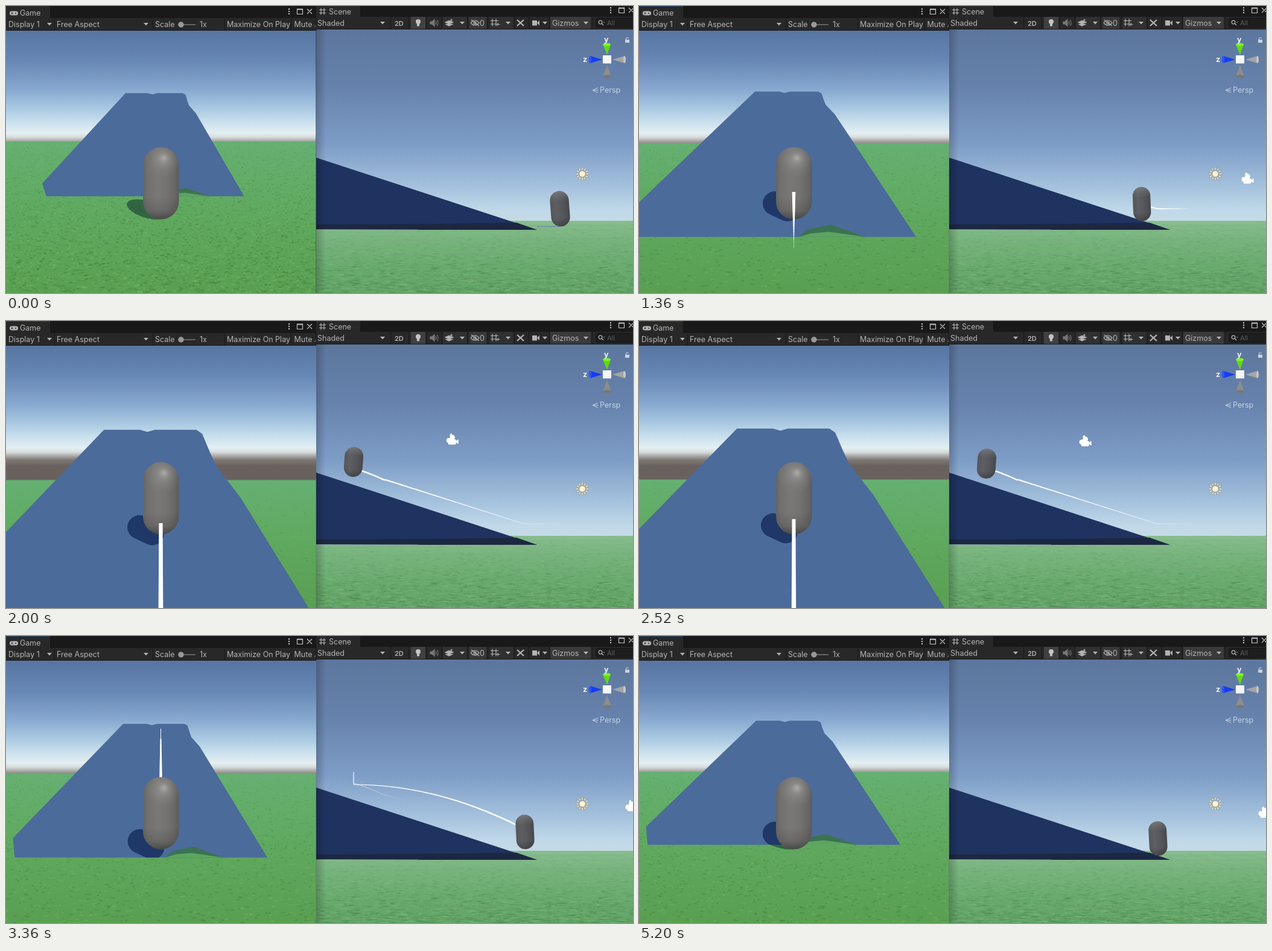
Animation, 1039 px wide and 477 px high, one loop 5.28 s. Source, as an HTML page with a canvas:

```html
<!DOCTYPE html>
<html lang="en">
<head>
<meta charset="utf-8">
<title>Ramp jump</title>
<style>
html, body { margin: 0; width: 100%; height: 100%; overflow: hidden; background: #191919; }
canvas, svg { position: absolute; left: 0; top: 0; display: block; }
text { font: 12.5px Inter, "Liberation Sans", sans-serif; fill: #b4b4b4; }
</style>
</head>
<body>
<canvas id="view" width="1039" height="477"></canvas>
<svg id="ui" width="1039" height="477" viewBox="0 0 1039 477">
  <g id="bars">
    <rect width="514" height="41" fill="#191919"/>
    <rect width="73" height="21" fill="#282828"/>
    <rect y="20" width="513" height="20" fill="#282828"/>
    <rect x="514" width="525" height="39" fill="#191919"/>
    <rect x="514" width="73" height="19" fill="#282828"/>
    <rect x="514" y="18" width="525" height="20" fill="#282828"/>
    <rect x="671" y="18" width="24" height="20" fill="#404040"/>
    <rect x="724" y="18" width="40" height="20" fill="#303030"/>
    <rect x="768" y="18" width="28" height="20" fill="#383838"/>
    <rect x="802" y="18" width="38" height="20" fill="#303030"/>
    <rect x="902" y="18" width="67" height="20" fill="#3a3a3a"/>
    <rect x="977.5" y="20.5" width="70" height="15" rx="3" fill="#1e1e1e" stroke="#141414"/>
  </g>
  <rect id="focus" width="73" height="1" fill="#24486b"/>
  <g id="icons" fill="none" stroke="#b4b4b4" stroke-width="1.2">
    <rect x="6.5" y="9" width="13" height="6" rx="3" fill="#b4b4b4"/>
    <path d="M8.5 12h3M10 10.5v3" stroke="#282828"/><circle cx="16" cy="12" r="1" fill="#282828" stroke="none"/>
    <path d="M519 6.500h11M519 11.500h11M522 3.500v11M527 3.500v11"/>
    <path d="M285 31h29" stroke="#636363" stroke-width="2"/><circle cx="290" cy="31" r="4.700" fill="#999" stroke="none"/>
    <g fill="#c4c4c4" stroke="none"><circle cx="683" cy="26" r="4"/><rect x="681" y="29" width="4" height="4.500"/></g>
    <g stroke="#777"><path d="M703 26h3l4-3.500v11l-4-3.500h-3z" fill="#777"/><path d="M712 25q2 3 0 6M714.500 23q3 5 0 10"/></g>
    <path d="M728 27l6-2.500 7 2.500-7 3zM728 30l6 3 7-3M738 21.500v4M736 23.500h4" fill="#b4b4b4"/>
    <path d="M770 28q7-8 14 0q-7 8-14 0M771 23l13 10"/><circle cx="777" cy="28" r="2"/>
    <path d="M803 24.500h13M803 30h9M806 21.500v12M812 21.500v12M815 28v5M812.500 30.500h6"/>
    <path d="M847 23l11 10M858 23l-11 10" stroke-width="2.300"/>
    <g fill="#b4b4b4" stroke="none"><rect x="872" y="24" width="8" height="8.500"/><path d="M880 28l4-4v8.500z"/></g>
    <circle cx="985" cy="27" r="2.800"/><path d="M987 29l3 3M990 27l2 0"/>
    <g stroke="none"><rect x="1026" y="56" width="7" height="5" fill="#ccd3dc"/></g>
    <path d="M1027.500 56v-2q2-3 4 0" stroke="#ccd3dc"/>
  </g>
  <g id="labels">
    <text x="23" y="16">Game</text><text x="4" y="35">Display 1</text><text x="84" y="35">Free Aspect</text>
    <text x="247" y="35">Scale</text><text x="321" y="35">1x</text><text x="366" y="35">Maximize On Play</text>
    <svg x="474" width="38.500" height="41"><text x="3.500" y="35">Mute Audio</text></svg>
    <text x="535" y="14">Scene</text><text x="516" y="33">Shaded</text>
    <text x="644" y="32.500" style="font-size:11px;font-weight:600">2D</text>
    <text x="785" y="33">0</text><text x="905" y="33">Gizmos</text>
    <text x="996" y="32" style="font-size:11px;fill:#5c5c5c">All</text>
  </g>
  <g id="gizmo">
    <path d="M989 64L996 81L1002 64Z" fill="#63d813"/><ellipse cx="995.500" cy="64" rx="6.500" ry="2.500" fill="#7df52b"/>
    <path d="M968 83L988 89L968 95Z" fill="#153df0"/><ellipse cx="968" cy="89" rx="2.300" ry="6" fill="#2b55ff"/>
    <path d="M1025 83L1005 89L1025 95Z" fill="#a5a5a5"/><ellipse cx="1025" cy="89" rx="2" ry="6" fill="#c6c6c6"/>
    <path d="M989 117L996 98L1003 117Z" fill="#8d8d8d"/><ellipse cx="996" cy="117" rx="7" ry="2.500" fill="#777"/>
    <rect x="989" y="82" width="14" height="13.500" fill="#f4f6f8"/>
    <text x="991" y="60" style="font-weight:700;fill:#f0f4f8">y</text>
    <text x="956" y="92.500" style="font-weight:700;fill:#f0f4f8">z</text>
    <path d="M981 136l-9 4 9 4M972 140h9" fill="none" stroke="#c3d2e6"/>
    <text x="984" y="144" style="fill:#c3d2e6">Persp</text>
  </g>
</svg>
<script>
const g = document.getElementById('view').getContext('2d');
const LOOP = 5280, STEP = 40, TRAIL = 1650, GO = 1180;
const focusLine = document.getElementById('focus');

// toolbar repeats
const extras = [];
for (const x of [80, 243, 362, 472]) extras.push(`<path d="M${x}.5 21v19" stroke="#1b1b1b"/>`);
for (const x of [637, 667, 696, 722, 764, 798, 842, 866, 900, 971]) extras.push(`<path d="M${x}.5 18v20" stroke="#1b1b1b"/>`);
for (const [x, y] of [[72, 30], [232, 30], [624, 28], [756, 28], [832, 28], [893, 28], [961, 28]])
  extras.push(`<path d="M${x - 4} ${y - 2}h8l-4 4.500z" fill="#b4b4b4" stroke="none"/>`);
for (const [x, y] of [[469, 9], [1002, 7]]) {
  for (const k of [-4, 0, 4]) extras.push(`<circle cx="${x}" cy="${y + k}" r="1.200" fill="#c4c4c4" stroke="none"/>`);
  extras.push(`<path d="M${x + 13.5} ${y - 4}h9v8.500h-9zM${x + 13.5} ${y - 3}h9M${x + 30} ${y - 4}l8 8m0-8l-8 8" stroke="#c4c4c4"/>`);
}
document.getElementById('icons').insertAdjacentHTML('beforeend', extras.join(''));

function seeded(s) {
  return () => (s = (s * 16807) % 2147483647) / 2147483647;
}

function fade(c, x0, y0, x1, y1, stops) {
  const f = c.createLinearGradient(x0, y0, x1, y1);
  stops.forEach(([p, col]) => f.addColorStop(p, col));
  return f;
}

function poly(pts, fill) {
  g.beginPath();
  pts.forEach(([x, y]) => g.lineTo(x, y));
  g.closePath();
  if (fill) { g.fillStyle = fill; g.fill(); }
}

// capsule position in the scene pane
function pos(t) {
  if (t <= GO) return [918, 337];
  if (t < 2725) {
    const x = Math.max(576, 918 - (t - GO) * 0.471);
    if (t < 1795) return [x, Math.min(337, 337 - (858 - x) * 0.319)];
    const s = t - 2275;
    const y = s < 0 ? 226 + 39 * (-s / 480) ** 2.8 : Math.min(247, 226 + 0.000183 * s * s);
    return [x, y];
  }
  const s = t - 2725;
  return [Math.min(860, 576 + s * 0.46), Math.min(336.5, 247 + 0.000195 * s * s)];
}

// trail points from newest to oldest, each with its width share
function trailAt(t) {
  const end = Math.max(GO, t - TRAIL), pts = [];
  if (t <= GO) return pts;
  let len = 0;
  for (let s = t; s >= end; s -= 8) {
    const p = pos(s), q = pts[pts.length - 1];
    if (q) len += Math.hypot(p[0] - q[0], p[1] - q[1]);
    pts.push([p[0], p[1], len]);
  }
  if (len < 0.5) return [];
  pts.forEach(p => { p[2] = 1 - p[2] / len; });
  return pts;
}

function stroke(x0, y0, x1, y1, w, col) {
  g.strokeStyle = col;
  g.lineWidth = w;
  g.beginPath(); g.moveTo(x0, y0); g.lineTo(x1, y1); g.stroke();
}

// fixed backdrop of the scene pane
const back = document.createElement('canvas');
back.width = 525; back.height = 438;
(function () {
  const c = back.getContext('2d'), rnd = seeded(41);
  c.translate(-514, -39);
  c.fillStyle = fade(c, 0, 39, 0, 357, [[0, '#5c769d'], [0.3, '#6682ac'], [0.6, '#7d9cc6'], [0.82, '#a4c1dd'], [0.95, '#c1d9e9'], [1, '#c5dae5']]);
  c.fillRect(514, 39, 525, 318);
  c.fillStyle = fade(c, 0, 357, 0, 477, [[0, '#88be8e'], [0.25, '#78b47e'], [0.6, '#6aab6f'], [1, '#60a264']]);
  c.fillRect(514, 357, 525, 120);
  for (let i = 0; i < 2400; i++) {
    const k = Math.sqrt(rnd()), y = 358 + k * 119;
    c.fillStyle = rnd() < 0.5 ? 'rgba(40,95,45,.12)' : 'rgba(160,210,155,.13)';
    c.fillRect(510 + rnd() * 530, y, 4 + k * 12 * rnd(), 0.6 + k * 1.1);
  }
  c.strokeStyle = 'rgba(130,150,135,.28)';
  c.lineWidth = 0.8;
  for (let i = -6; i < 9; i++) {
    c.beginPath(); c.moveTo(740 + i * 42, 362); c.lineTo(800 + i * 125, 477); c.stroke();
  }
  for (const y of [366, 374, 388, 412, 452]) {
    c.beginPath(); c.moveTo(514, y + 3); c.lineTo(1039, y - 2); c.stroke();
  }
})();

function drawScene(x, y, trail) {
  g.save();
  g.beginPath(); g.rect(514, 39, 525, 438); g.clip();
  g.drawImage(back, 514, 39);

  poly([[514, 252], [880, 372], [514, 372]], '#1f3360');
  poly([[514, 363], [720, 362], [846, 360], [880, 372], [683, 372], [514, 371]], '#1c2842');
  stroke(514, 371.5, 683, 372, 1, '#7f93a2');
  if (x > 885) stroke(x - 38, 366.5, x, 366.5, 1, '#6684a6');

  // sun
  g.save();
  g.translate(955, 279);
  for (let i = 0; i < 12; i++) {
    g.rotate(Math.PI / 6);
    stroke(7, 0, 11, 0, 2.6, '#8b8570');
    stroke(7, 0, 10.5, 0, 1.5, '#fdf3d4');
  }
  g.beginPath(); g.arc(0, 0, 5.3, 0, 7);
  g.fillStyle = '#fff3cd'; g.fill();
  g.strokeStyle = '#8b8570'; g.lineWidth = 0.8; g.stroke();
  g.restore();

  for (let i = 1; i < trail.length; i++) {
    const a = trail[i - 1], b = trail[i];
    stroke(a[0], a[1], b[0], b[1], 0.05 + 2.9 * b[2], '#fff');
  }

  const off = x - 739, w = 27 + Math.abs(off) * 0.024, h = 54 + off * 0.027;
  g.save();
  g.translate(x, y);
  g.rotate(-off * 0.024 * Math.PI / 180);
  g.beginPath(); g.roundRect(-w / 2, -h / 2, w, h, w / 2);
  g.fillStyle = fade(g, -w / 2, 0, w / 2, 0, [[0, '#545659'], [0.3, '#5d5f62'], [0.65, '#54565a'], [1, '#47494d']]);
  g.fill();
  g.fillStyle = fade(g, 0, -h / 2, 0, h / 2, [[0, 'rgba(135,137,138,.6)'], [0.3, 'rgba(120,122,124,0)'], [0.75, 'rgba(30,32,36,0)'], [1, 'rgba(25,28,32,.35)']]);
  g.fill();
  g.restore();

  // camera marker
  g.save();
  g.translate(x + 171 + off * 0.045, y - 40 - off * 0.02);
  g.fillStyle = '#fff';
  g.beginPath(); g.roundRect(-7, -1, 13, 9, 2); g.fill();
  g.beginPath(); g.arc(-6, 1, 4, 0, 7); g.fill();
  g.beginPath(); g.arc(0, -4, 4.3, 0, 7); g.fill();
  poly([[4, 3], [10, -1], [10, 7]], '#fff');
  poly([[-5, -7], [-2, -11], [1, -7]], '#fff');
  g.restore();

  g.fillStyle = fade(g, 514, 0, 530, 0, [[0, 'rgba(0,0,0,.2)'], [1, 'rgba(0,0,0,0)']]);
  g.fillRect(514, 39, 16, 438);
  g.restore();
}

// grass specks on the ground of the game pane
const rnd = seeded(7);
const specks = Array.from({ length: 9000 }, () => {
  const z = 1 / (0.05 + 1.15 * rnd());
  return [(rnd() - 0.5) * 600 * z, z, rnd()];
});

function drawGame(x, y, trail) {
  const MID = 256, EYE = 209, LEN = 7.18, TOP = 983;
  const ahead = (918 - x) / 87.5, up = 327 + 4.65 * (337 - y);
  const zb = 3.05 - ahead;
  const put = (X, Y, z) => [MID + X / z, EYE + (up - Y) / z];
  const edge = (X, k) => put(X, TOP * k, zb + LEN * k);

  g.save();
  g.beginPath(); g.rect(0, 41, 513.5, 436); g.clip();
  g.fillStyle = fade(g, 0, 41, 0, 241, [[0, '#5775a1'], [0.25, '#6787b4'], [0.48, '#86a7cf'], [0.65, '#aac9e2'], [0.77, '#cde2ee'],
    [0.85, '#e4eff2'], [0.885, '#d6dcdc'], [0.92, '#a5a3a1'], [0.95, '#7d7774'], [1, '#69615e']]);
  g.fillRect(0, 41, 514, 436);

  const rim = EYE + up / (20.4 - 1.5 * ahead);
  g.fillStyle = fade(g, 0, rim, 0, 477, [[0, '#65b072'], [0.2, '#62ad69'], [0.55, '#5ea75d'], [1, '#599f52']]);
  g.fillRect(0, rim, 514, 477 - rim);
  specks.forEach(([X, z0, size], i) => {
    const z = z0 - ahead;
    if (z < 0.5) return;
    const [sx, sy] = put(X, 0, z);
    if (sy < rim || sy > 477 || sx < -6 || sx > 514) return;
    const k = (sy - rim) / 250;
    g.fillStyle = i % 2 ? 'rgba(35,85,25,.17)' : 'rgba(160,210,120,.15)';
    g.fillRect(sx, sy, 1.5 + k * 6 * size, 0.8 + k * 1.6);
  });

  // shadow on the grass
  g.fillStyle = 'rgba(28,70,52,.68)';
  g.beginPath(); g.ellipse(233, 338, 34, 14, 0.3, 0, 7); g.fill();

  // ramp
  const near = (0.15 - zb) / LEN, low = Math.max(0, near), cut = Math.max(0.0407, near);
  const right = [[1, 375], [0.95, 412], [0.79, 388], [0.69, 376], [0.55, 412]].filter(p => p[0] > low);
  const ramp = [edge(-655, cut), edge(-592, 1), edge(-215, 1), put(-137, TOP - 22, zb + LEN), edge(-58, 1),
    ...right.map(([k, X]) => edge(X, k)), edge(423, low), edge(-577, low)];
  poly(ramp, '#4b6b9b');

  g.save();
  g.clip();
  const gap = Math.max(0, 337 - Math.max(0, 858 - x) * 0.319 - y);
  const sx = 233 - 0.3 * gap, sy = 331 + 1.15 * gap + Math.max(0, 58 - (918 - x)) * 0.5;
  g.lineCap = 'round';
  stroke(sx - 8, sy - 3, sx + 13, sy + 7, 40, '#1f3868');
  g.restore();
  g.lineCap = 'butt';

  // grass rising over the foot of the ramp
  if (zb > 0.15) {
    poly([put(20, 0, zb), put(45, 25, zb), put(130, 42, zb), put(248, 0, zb)], '#3b7351');
    poly([put(20, 0, zb), put(60, 12, zb), put(120, 18, zb), put(248, 0, zb)], '#5ca560');
  }

  const ribbon = front => {
    for (let i = 1; i < trail.length; i++) {
      const a = trail[i - 1], b = trail[i];
      if (Math.abs(b[0] - x) < 12.5 && Math.abs(b[1] - y) < 24) continue;
      const za = 2.05 + (x - a[0]) / 87.5, zc = 2.05 + (x - b[0]) / 87.5;
      if (za < 0.2 || zc < 0.2 || (zc < 2.05) !== front) continue;
      const ya = EYE + (176 + (a[1] - y) * 4.65) / za;
      const yb = EYE + (176 + (b[1] - y) * 4.65) / zc;
      const e = yb > ya ? 0.3 : -0.3;
      stroke(256.5, ya - e, 256.5, yb + e, 12.5 * b[2] / zc, '#fff');
    }
  };

  ribbon(false);
  drawCapsule();
  ribbon(true);
  g.restore();
}

function drawCapsule() {
  g.beginPath(); g.roundRect(227, 234.5, 59.5, 120, 29.7);
  g.fillStyle = fade(g, 227, 0, 286.5, 0, [[0, '#656463'], [0.12, '#72706f'], [0.4, '#7a7876'], [0.65, '#757371'], [0.88, '#696766'], [1, '#5c5b5a']]);
  g.fill();
  const shine = g.createRadialGradient(262, 252, 1, 259, 258, 30);
  shine.addColorStop(0, 'rgba(178,176,172,.85)');
  shine.addColorStop(0.3, 'rgba(148,147,145,.6)');
  shine.addColorStop(1, 'rgba(120,120,120,0)');
  g.fillStyle = shine; g.fill();
  g.fillStyle = fade(g, 0, 318, 0, 355, [[0, 'rgba(45,45,45,0)'], [0.6, 'rgba(45,46,45,.2)'], [1, 'rgba(35,42,36,.6)']]);
  g.fill();
}

let last = -1;
const start = performance.now();
function tick() {
  const t = Math.floor(((performance.now() - start) % LOOP) / STEP) * STEP;
  if (t !== last) {
    last = t;
    const [x, y] = pos(t), trail = trailAt(t);
    drawGame(x, y, trail);
    drawScene(x, y, trail);
    focusLine.style.display = t >= 600 ? '' : 'none';
  }
  requestAnimationFrame(tick);
}
tick();
</script>
</body>
</html>
```
